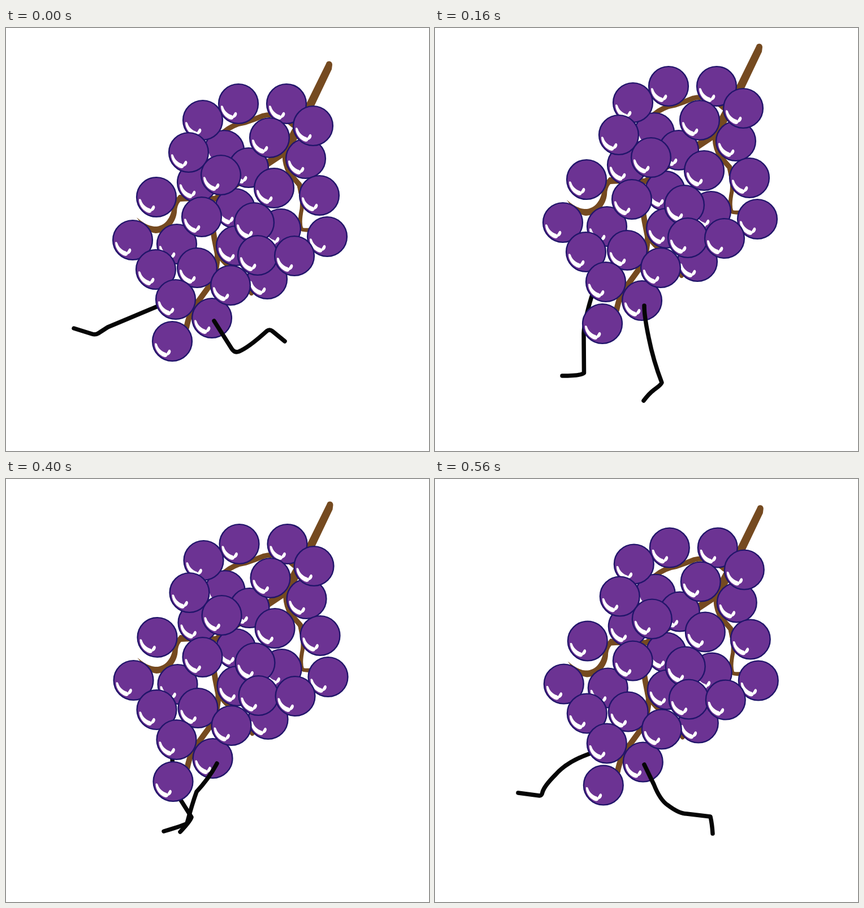
Animation, 748 px wide and 748 px high, one loop 640 ms. Source, as an HTML page:

```html
<!DOCTYPE html>
<html lang="en">
<head>
<meta charset="utf-8">
<title>Running grapes</title>
<style>
  html, body { margin: 0; width: 100%; height: 100%; overflow: hidden; background: #fff; }
  svg { display: block; width: 100%; height: 100%; }
  .leg { fill: none; stroke: #060606; stroke-width: 7.5; stroke-linecap: round; stroke-linejoin: round; }
  .stem { fill: none; stroke: #754a20; stroke-linecap: round; stroke-linejoin: round; }
  .wood { fill: #754a20; }
</style>
</head>
<body>
<svg viewBox="0 0 748 748">
  <defs>
    <g id="grape">
      <circle r="34.9" fill="#6c3393" stroke="#21156a" stroke-width="2.4"/>
      <path fill="#fff" d="M-31 4C-29 2-27 4-26 8C-23 14-18 18-12 20C-7 23-8 28-13 28C-22 26-31 16-31 4Z"/>
      <path fill="#fff" d="M-4 15C-1 17-3 23-8 25C-12 25-10 20-8 18C-7 16-6 14-4 15Z"/>
    </g>
  </defs>
  <path id="back" class="leg"/>
  <g id="body">
    <path class="wood" d="M566 63C567 57 577 57 577 65L576 73L546 136L520 186Q506 216 488 230L440 262L432 250L468 228Q490 210 500 190L533 130Z"/>
    <path class="wood" d="M231 335Q248 350 262 351C280 352 290 337 293 322Q298 303 306 295L325 295L325 306L308 307Q302 314 302 326C300 344 286 362 265 363Q249 362 231 335Z"/>
    <g class="stem" stroke-width="10">
      <path d="M508 172Q482 148 455 155Q438 162 423 167Q402 170 385 184" stroke-width="9"/>
      <path d="M492 226Q493 246 502 259L518 278Q525 297 523 320Q518 344 522 355Q525 359 545 356" stroke-width="7"/>
      <path d="M504 260L519 277L522 292" stroke-width="9"/>
      <path d="M310 301L370 302L445 252"/>
      <path d="M364 345Q368 372 374 400Q374 430 359 457L338 486Q325 500 319 530"/>
      <path d="M372 393Q382 415 400 425L434 469" stroke-width="8"/>
    </g>
    <g id="grapes"></g>
  </g>
  <path id="front" class="leg"/>
</svg>
<script>
const $ = id => document.getElementById(id);
const STEP = 80;

// Centres, listed from the rearmost grape to the nearest.
const grapes = [
  [386,216], [338,273], [405,319], [486,355], [407,385], [462,444], [302,382],
  [411,134], [496,134], [530,231], [429,247], [474,283], [466,194], [348,163],
  [543,173], [323,220], [380,260], [554,296], [266,299], [346,334], [439,344],
  [568,369], [224,375], [445,402], [510,403], [265,427], [338,424],
  [364,513], [397,455], [300,480], [294,554]
];
$('grapes').innerHTML = grapes
  .map(([x, y]) => `<use href="#grape" x="${x}" y="${y}"/>`).join('');

// One stride from full stretch to crossed legs; played forth and back.
const poses = [
  { at: [0, 0],
    back: 'M280 487L266 493L180 529L163 540Q158 543 152 541L120 531',
    front: 'M368 518L399 567Q404 575 412 572Q429 565 461 536Q466 532 471 536L493 554' },
  { at: [3.8, -12.5],
    back: 'M290 479L270 487Q232 501 213 523Q193 543 190 554Q189 560 185 560L147 555',
    front: 'M370 505L387 540Q398 568 412 577Q432 592 445 592L487 597Q490 610 491 627' },
  { at: [2, -31],
    back: 'M282 460L276 478Q264 518 263 540L263.500 610Q258 615 225 615',
    front: 'M370 491Q370 510 378 548Q386 588 401 627Q401 630 387 640Q378 647 369 659' },
  { at: [1.5, -19],
    back: 'M293 470L294 492Q295 540 306 563L328 598Q326 605 308 624',
    front: 'M373 503Q360 528 337 553Q329 575 320 609Q316 612 279 623' },
  { at: [1, -7.3],
    back: 'M306 490L308 512Q314 545 330 560Q347 579 375 582L389 583Q393 584 393 590Q389 612 390 632',
    front: 'M376 514Q351 531 320 545Q285 559 260 577L243 590Q240 592 230 591L188 587' }
];

function draw(ms) {
  const i = Math.floor(ms / STEP) % 8;
  const { at, back, front } = poses[Math.min(i, 8 - i)];
  $('body').setAttribute('transform', `translate(${at})`);
  $('back').setAttribute('d', back);
  $('front').setAttribute('d', front);
}

let start;
function tick(now) {
  start ??= now;
  draw(now - start);
  requestAnimationFrame(tick);
}
draw(0);
requestAnimationFrame(tick);
</script>
</body>
</html>
```
